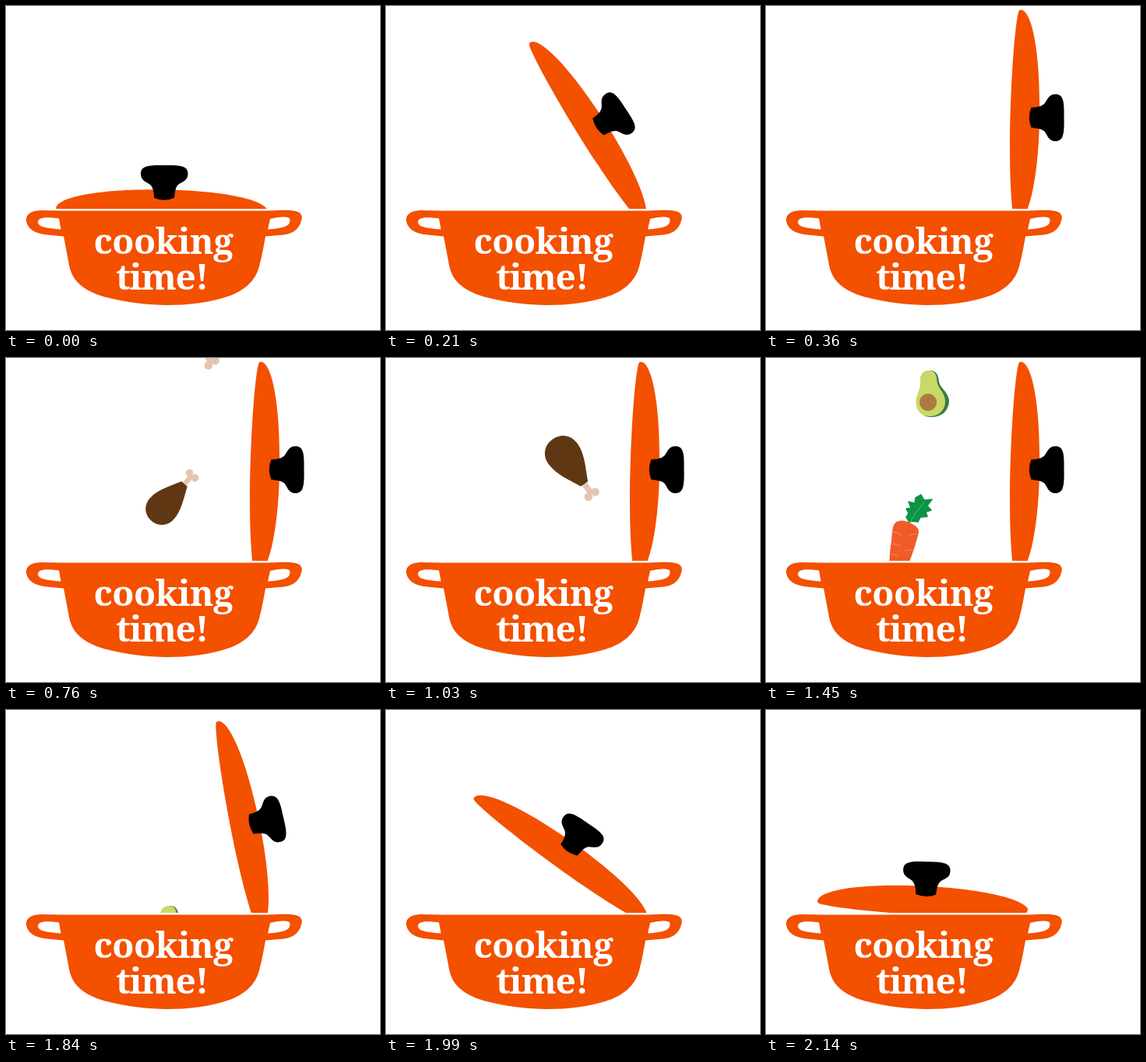
Animation, 480 px wide and 417 px high, one loop 2170 ms. Source, as an HTML page:

```html
<!DOCTYPE html>
<html lang="en">
<head>
<meta charset="utf-8">
<title>Cooking time</title>
<style>
  html, body { margin: 0; width: 100%; height: 100%; overflow: hidden; background: #fff; }
  svg { display: block; width: 480px; height: 417px; }
  .orange { fill: #f35000; }
  .label {
    font: 700 46px "Noto Serif", "Liberation Serif", serif;
    letter-spacing: -.5px;
    fill: #fff;
    text-anchor: middle;
  }
  .tight { letter-spacing: -1.2px; }
</style>
</head>
<body>
<svg viewBox="0 0 480 417">
  <defs>
    <clipPath id="aboveRim"><rect width="480" height="261"/></clipPath>
    <g id="drumstick">
      <g fill="#e3c5b1">
        <rect x="38" y="-3.3" width="20" height="6.6"/>
        <circle cx="58" cy="-4.8" r="4.8"/>
        <circle cx="58" cy="4.8" r="4.8"/>
      </g>
      <path fill="#5f3813" d="M-20.5 0C-20.5-12-12-20.5 0-20.5C15-20.5 28-12 43-5L43 5C28 12 15 20.5 0 20.5C-12 20.5-20.5 12-20.5 0Z"/>
    </g>
  </defs>

  <g clip-path="url(#aboveRim)">
    <g id="stick1"><use href="#drumstick" transform="translate(200 194) rotate(-47.7)"/></g>
    <g id="stick2"><use href="#drumstick" transform="translate(227 123) rotate(54.7) scale(1.11)"/></g>

    <g id="carrot">
      <path fill="#f15a29" d="M166 212C172 207 182 209 190 215C197 219 197 224 194 232C186 262 175 285 160 297C157 290 158 250 161 235C162 225 162 216 166 212Z"/>
      <path fill="none" stroke="#f68b62" stroke-width="1" stroke-linecap="round" d="M163 224Q169 224 174 228M194 226Q188 226 184 229M161 239Q168 239 173 242M188 247Q183 246 179 248M160 252Q165 252 169 255"/>
      <path fill="#0a9444" stroke="#0a9444" stroke-width="1.5" stroke-linejoin="round" d="M184 211L180 205L183 200L180 194L186 193L183 185L191 187L192 180L199 176L203 183L213 182L207 190L212 196L205 198L207 204L198 205L195 211L188 210Z"/>
      <path fill="none" stroke="#5cb56f" stroke-width="1" d="M185 211Q192 198 203 186"/>
    </g>

    <g id="avocado">
      <g transform="translate(1 0)">
        <path fill="#347d43" d="M209 16C217 16 220 21 221 30C222 39 234 44 234 56C233 69 224 76 211 76C200 76 196 70 198 58Z"/>
        <path fill="#c9d867" d="M208 16C215 16 218 21 218.500 30C219 39 229 44 229 56C229 68 220 75 209 75C198 75 191.500 68 191.500 57C192 46 198 40 197 30C196 22 201 16 208 16Z"/>
        <circle cx="207" cy="57" r="11" fill="#ad7a40"/>
      </g>
    </g>

    <g id="lid">
      <path class="orange" d="M64.500 260C65 248.500 106 236.300 190 236.300C262 236.300 322 246 334 260C336 266 330 271 320 271.500C290 274 270 274.500 240 274.500C160 274 80 268 66 263Q64 262 64.500 260Z"/>
      <path d="M203 205C225 204.500 233.500 206 233.500 216C233.500 225 226 226 221 230C217 234 217 240 216 247Q203 252.500 190 247C190 240 189 234 185 230C180 226 173 225 173 216C173 206 182 204.500 203 205Z"/>
    </g>
  </g>

  <path class="orange" d="M71 263.500H336C350 263 364 262 372 264C380 266 381 271 378.500 278C375 288 368 293 356 294.500L333 296.500C331 307 329 320 326 331C322 350 312 362 290 372C262 382 235 385 205 385C172 384 142 380 116 371C93 361 83 350 80 328L74 296.500L53 294.500C37 293 28 287 26 277C25 267 34 263 46 263Z"/>
  <path fill="#fff" d="M68 273.500C58 272 41 270.500 41 278C41 285 54 286 70.500 287.500ZM339 274C347 272 364 269 364.500 275C365 285 352 286 336 287.500Z"/>
  <text class="label" x="202" y="318.500">cooking</text>
  <text class="label tight" x="200" y="365">time!</text>
</svg>

<script>
  const LOOP = 2170, STEP = 30;
  const HOLD_START = 360, HOLD_END = 460;
  const CLOSE_START = 1730, CLOSE_TIME = 452;
  const HINGE = "324 263.5";

  // Drawn position is reached at time `at`; speed in px per ms.
  const foods = [
    { id: "stick1", at: 760, speed: 0.65 },
    { id: "stick2", at: 1030, speed: 0.626 },
    { id: "carrot", at: 1450, speed: 0.72 },
    { id: "avocado", at: 1450, speed: 0.605 }
  ];

  // Slide of the hinge by lid angle: [angle, dx, dy]
  const slide = [[0, 0, 0], [2, 1.5, -6], [77.5, 1, 5], [90, 0, 1]];

  const el = id => document.getElementById(id);
  const ease = u => (1 - Math.cos(Math.PI * Math.min(1, Math.max(0, u)))) / 2;

  function hingeShift(angle) {
    let i = 1;
    while (i < slide.length - 1 && angle > slide[i][0]) i++;
    const [a, b] = [slide[i - 1], slide[i]];
    const u = (angle - a[0]) / (b[0] - a[0]);
    return [1, 2].map(k => a[k] + (b[k] - a[k]) * u);
  }

  function snap(t) {
    if (t < HOLD_START) return t - t % STEP;
    if (t < HOLD_END) return HOLD_START;
    return t - (t - HOLD_END) % STEP;
  }

  function draw(time) {
    const t = snap(time % LOOP);
    const angle = 90 * (ease(t / HOLD_START) - ease((t - CLOSE_START) / CLOSE_TIME));
    el("lid").setAttribute("transform", `translate(${hingeShift(angle)}) rotate(${angle} ${HINGE})`);
    for (const { id, at, speed } of foods) {
      el(id).setAttribute("transform", `translate(0 ${(t - at) * speed})`);
    }
  }

  const start = performance.now();
  function tick() {
    draw(performance.now() - start);
    requestAnimationFrame(tick);
  }
  tick();
</script>
</body>
</html>
```
